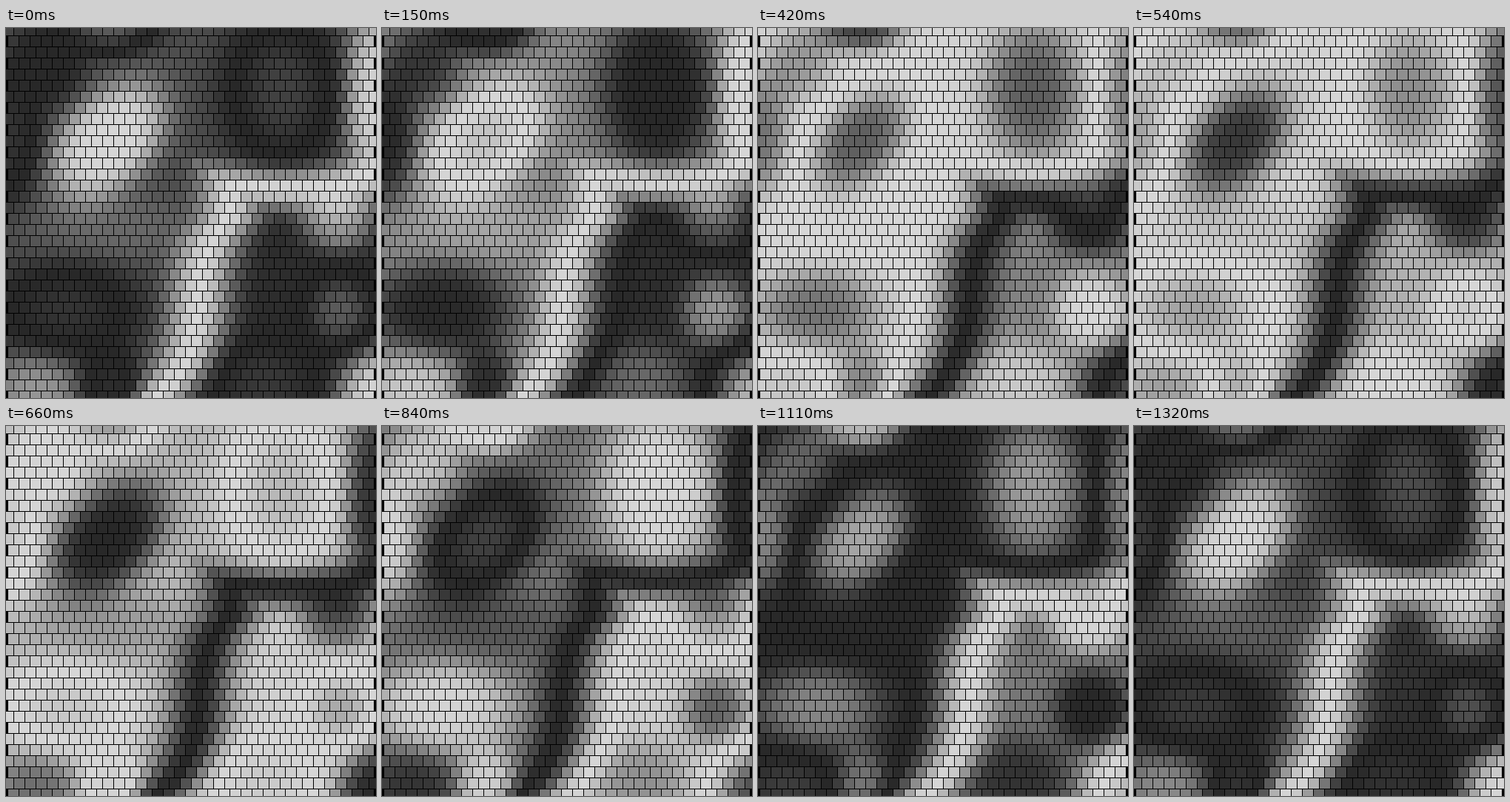
Write an HTML page with a canvas that moves like this. It is 500 px wide and 500 px high and loops after 1350 ms.

```html
<!DOCTYPE html>
<html lang="en">
<head>
<meta charset="utf-8">
<title>Brick waves</title>
<style>
  html, body { margin: 0; width: 100%; height: 100%; overflow: hidden; background: #000; }
  canvas { display: block; width: 500px; height: 500px; }
</style>
</head>
<body>
<canvas id="stage" width="500" height="500"></canvas>
<script>
const LOOP = 1350, STEP = 30, SIZE = 15, STAGE = 500;
const DARK = 40, LIGHT = 214;

// Soft elliptical hill (height > 0) or hollow (height < 0), optionally leaning
const hill = (cx, cy, rx, ry, height, lean = 0) => (x, y) => {
  const dx = (x - cx + lean * (y - cy)) / rx, dy = (y - cy) / ry;
  return height * Math.exp(-((dx * dx + dy * dy) ** 1.5));
};

// Steep drop towards the lower right, along a wall and a ledge
function cliff(x, y) {
  const u = (Math.max(y, 255) - 370) / 110;
  const wall = (x - (266 - 10 * u - 28 * u ** 3)) / 165;
  const ledge = (y - 218) / 115;
  const t = Math.min(1, Math.max(0, Math.min(wall, ledge) + 0.5));
  return -285 * t * t * (3 - 2 * t);
}

const terrain = [
  cliff,
  hill(138, 152, 68, 77, -125, 0.4),
  hill(0, 145, 45, 85, 85),
  hill(140, -5, 60, 38, 120),
  hill(55, 45, 48, 55, 60),
  hill(372, 85, 75, 105, 100),
  hill(505, 95, 48, 130, -105),
  hill(150, 270, 120, 45, -20),
  hill(80, 380, 95, 60, 85),
  hill(140, 490, 40, 60, 75),
  hill(40, 490, 60, 55, -50),
  hill(450, 382, 48, 50, -85),
  hill(350, 480, 75, 60, -55),
  hill(515, 500, 70, 70, 150),
  hill(450, 265, 55, 38, 85)
];

// Phase delay of the brightness wave
const delay = (x, y) =>
  terrain.reduce((sum, part) => sum + part(x, y), 125) * Math.PI / 180;

// Brick centres; every second row is shifted by half a brick
const bricks = [];
for (let row = 0, y = 2.5; y < STAGE; y += SIZE, row++) {
  for (let x = row % 2 ? 9.5 : 2.5; x < STAGE; x += SIZE) {
    bricks.push({ left: Math.floor(x - 6.5 + (row % 2 ? 0 : 0)), top: y - 6.5, delay: delay(x, y) });
  }
}

const ctx = document.getElementById("stage").getContext("2d");

function draw(ms) {
  const angle = ms / LOOP * 2 * Math.PI;
  ctx.fillStyle = "#000";
  ctx.fillRect(0, 0, STAGE, STAGE);
  for (const b of bricks) {
    const v = Math.round(DARK + (LIGHT - DARK) * (1 + Math.cos(angle - b.delay)) / 2);
    ctx.fillStyle = `rgb(${v},${v},${v})`;
    ctx.fillRect(b.left, b.top, SIZE - 1, SIZE - 1);
  }
}

const start = performance.now();
function tick() {
  const t = (performance.now() - start) % LOOP;
  draw(Math.floor(t / STEP) * STEP);
  requestAnimationFrame(tick);
}
tick();
</script>
</body>
</html>
```
